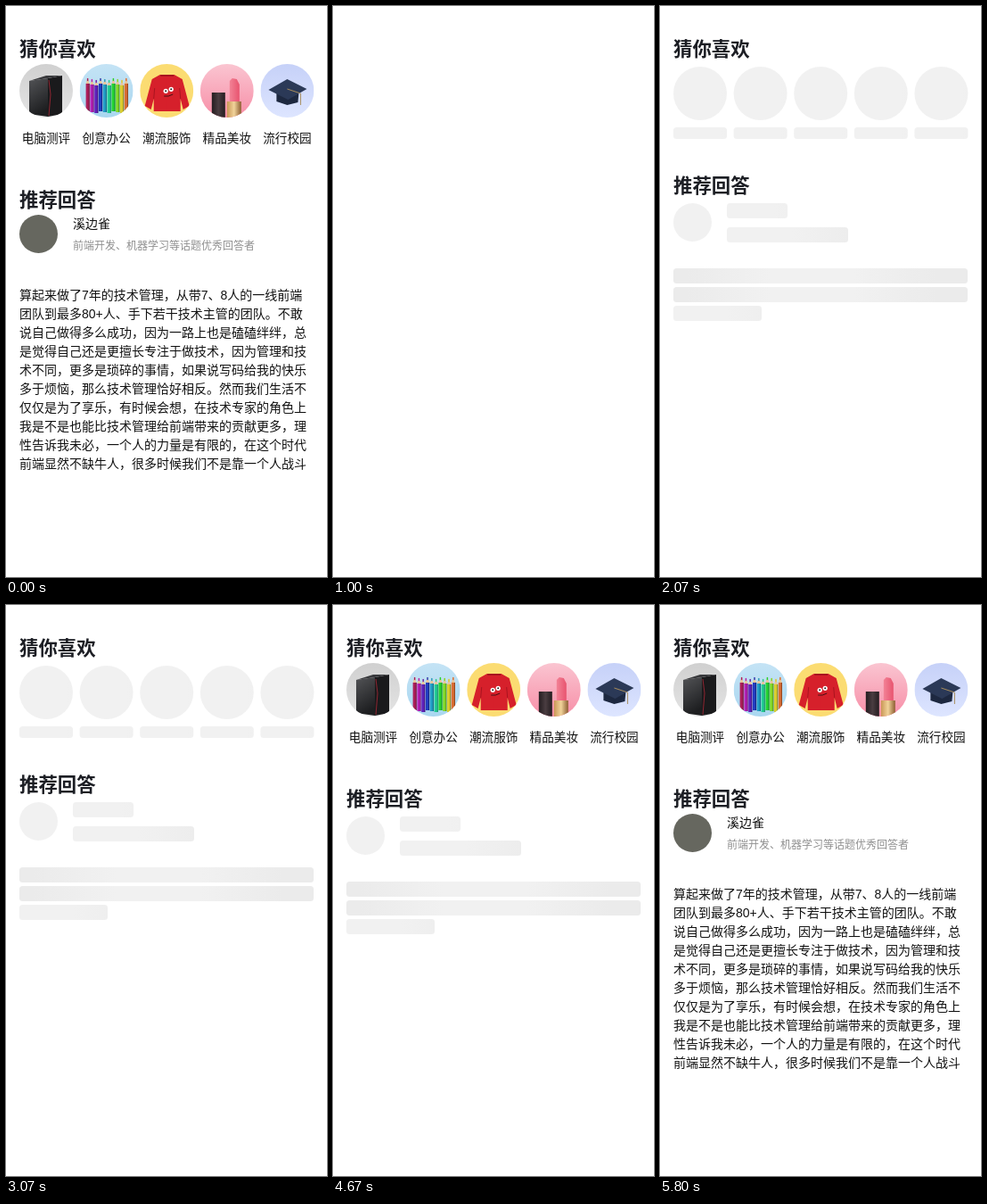
An HTML page with a canvas for the animation above (5940 ms loop, 360 px wide and 640 px high).

```html
<!DOCTYPE html>
<html lang="zh-CN">
<head>
<meta charset="utf-8">
<title>推荐回答</title>
<style>
html, body { margin: 0; width: 100%; height: 100%; overflow: hidden; background: #fff; }
canvas { display: block; width: 360px; height: 640px; }
</style>
</head>
<body>
<canvas id="stage"></canvas>
<script>
const W = 360, H = 640, LEFT = 15, LOOP = 5940;
const RELOAD = 1000, SKELETON = 1330, TOPICS = 3870, ANSWER = 4870;
const SWEEP = 270, STEP = 66.7, REACH = 140;
const FONT = '"Liberation Sans", "Noto Sans CJK SC", "Noto Sans CJK", sans-serif';
const INK = '#121212', GREY = '#ebebeb', LIGHT = '#f1f1f1';

const canvas = document.getElementById('stage');
const dpr = window.devicePixelRatio || 1;
canvas.width = W * dpr;
canvas.height = H * dpr;
const ctx = canvas.getContext('2d');

const topics = [
  ['电脑测评', drawComputer],
  ['创意办公', drawPencils],
  ['潮流服饰', drawSweater],
  ['精品美妆', drawLipstick],
  ['流行校园', drawCap]
];
const answer = [
  '算起来做了7年的技术管理，从带7、8人的一线前端',
  '团队到最多80+人、手下若干技术主管的团队。不敢',
  '说自己做得多么成功，因为一路上也是磕磕绊绊，总',
  '是觉得自己还是更擅长专注于做技术，因为管理和技',
  '术不同，更多是琐碎的事情，如果说写码给我的快乐',
  '多于烦恼，那么技术管理恰好相反。然而我们生活不',
  '仅仅是为了享乐，有时候会想，在技术专家的角色上',
  '我是不是也能比技术管理给前端带来的贡献更多，理',
  '性告诉我未必，一个人的力量是有限的，在这个时代',
  '前端显然不缺牛人，很多时候我们不是靠一个人战斗'
];

const columnX = i => 45 + i * 67.6;

function text(str, x, y, size, color = INK, weight = 400, align = 'left') {
  ctx.font = `${weight} ${size}px ${FONT}`;
  ctx.textAlign = align;
  ctx.fillStyle = color;
  ctx.fillText(str, x, y);
}

function title(str, y) {
  text(str, LEFT, y, 21.4, '#1c1e24', 700);
}

function rect(x, y, w, h, color) {
  ctx.fillStyle = color;
  ctx.fillRect(x, y, w, h);
}

function disc(x, y, r, color) {
  ctx.beginPath();
  ctx.arc(x, y, r, 0, Math.PI * 2);
  ctx.fillStyle = color;
  ctx.fill();
}

function path(points) {
  ctx.beginPath();
  for (const [x, y] of points) ctx.lineTo(x, y);
}

function poly(color, ...points) {
  path(points);
  ctx.fillStyle = color;
  ctx.fill();
}

function line(color, width, ...points) {
  path(points);
  ctx.strokeStyle = color;
  ctx.lineWidth = width;
  ctx.stroke();
}

function gradient(x0, y0, x1, y1, ...colors) {
  const g = ctx.createLinearGradient(x0, y0, x1, y1);
  colors.forEach((color, i) => g.addColorStop(i / (colors.length - 1), color));
  return g;
}

function backdrop(top, bottom) {
  rect(-30, -30, 60, 60, gradient(0, -30, 0, 30, top, bottom));
}

// Each picture is drawn around its own centre and clipped to a disc.
function badge(x, y, draw) {
  ctx.save();
  ctx.translate(x, y);
  ctx.beginPath();
  ctx.arc(0, 0, 30, 0, Math.PI * 2);
  ctx.clip();
  draw();
  ctx.restore();
}

function drawComputer() {
  backdrop('#d0d0d0', '#e4e4e4');
  poly(gradient(-19, -12, 2, 20, '#505154', '#1d1e20'), [-19, -11], [2, -14], [2, 29], [-19, 26]);
  poly('#1a1a1c', [2, -14], [18, -17], [18, 26], [2, 29]);
  poly('#38393c', [-19, -11], [0, -17], [18, -17], [2, -14]);
  line('#8f2531', 1, [3, -12], [5, 4], [3, 28]);
}

function drawPencils() {
  backdrop('#c4e3f5', '#a9d7f0');
  for (let i = 0; i < 10; i++) {
    const x = -23 + i * 4.8, top = -8 + i % 3, color = `hsl(${335 - i * 35} 70% ${40 + i * 1.5}%)`;
    poly('#e6c39a', [x, top], [x + 2, top - 7], [x + 4, top]);
    rect(x + 1.3, top - 6, 1.4, 3, color);
    rect(x, top, 4.2, 31, color);
    rect(x + 3, top, 1.2, 31, 'rgba(0,0,0,.3)');
  }
}

function drawSweater() {
  backdrop('#fbdc72', '#fbdc72');
  for (const side of [-1, 1]) {
    ctx.save();
    ctx.translate(0.5, 0);
    ctx.scale(side, 1);
    poly('#d6202b', [-0.5, -17], [8, -18], [17, -13], [25, 17], [18, 21], [15, 9], [15, 23], [-0.5, 23]);
    line('#a9141f', 1, [15, 9], [14, -3]);
    ctx.restore();
  }
  line('#a9141f', 2, [-7, -17], [8, -17]);
  for (const x of [-1, 5]) {
    disc(x, x / -3, 2.6, '#fff');
    disc(x, x / -3, 1, '#222');
  }
  line('#451015', 1, [-3, 6], [2, 6], [7, 4]);
}

function drawLipstick() {
  backdrop('#fac5d1', '#f78ea7');
  rect(-17, 2, 15, 30, gradient(-17, 0, -2, 0, '#241d20', '#4a3d41', '#241d20'));
  poly(gradient(3, 0, 14, 0, '#f28296', '#e8546f'), [3, 12], [3, -11], [6, -14], [11, -13], [14, -7], [14, 12]);
  rect(0, 12, 16, 20, gradient(0, 0, 16, 0, '#c99755', '#f1d39a', '#8c5d31'));
}

function drawCap() {
  backdrop('#c6d1f8', '#dde5ff');
  poly('#1d2840', [-12, 2], [13, 2], [12, 13], [0, 16], [-12, 12]);
  poly('#2b3957', [-21, -1], [0, -13], [22, -2], [1, 10]);
  line('#a88d5c', 1, [0, -2], [15, 3], [15, 16]);
}

// The highlight rests at a point that moves right as blocks get wider.
function block(x, y, w, h, p, radius = 3.5) {
  const c = x - REACH + (w * w / 700 + REACH) * p;
  ctx.fillStyle = p ? gradient(c - REACH, 0, c + REACH, 0, GREY, LIGHT, LIGHT, GREY) : GREY;
  ctx.beginPath();
  ctx.roundRect(x, y, w, h, radius);
  ctx.fill();
}

function topicBlocks(p) {
  topics.forEach((_, i) => {
    const x = columnX(i) - 30;
    block(x, 68, 60, 60, p, 30);
    block(x, 136, 60, 13, p);
  });
}

function answerBlocks(y, p) {
  block(LEFT, y, 43, 43, p, 21.5);
  block(75, y, 68, 17, p);
  block(75, y + 27, 136, 17, p);
  [330, 330, 99].forEach((w, i) => block(LEFT, y + 73 + i * 21, w, 17, p));
}

function topicRow() {
  topics.forEach(([label, draw], i) => {
    badge(columnX(i), 95, draw);
    text(label, columnX(i), 153, 13.6, INK, 400, 'center');
  });
}

function answerCard() {
  disc(36.5, 255.5, 21.5, '#66675f');
  text('溪边雀', 75, 249, 14);
  text('前端开发、机器学习等话题优秀回答者', 75, 273, 12, '#8f8f8f');
  answer.forEach((str, i) => text(str, LEFT, 329 + i * 21, 14));
}

// The highlight moves in coarse steps, then rests.
function sweep(elapsed) {
  return Math.min(1, Math.round(elapsed / STEP) * STEP / SWEEP);
}

function render(t) {
  ctx.setTransform(dpr, 0, 0, dpr, 0, 0);
  rect(0, 0, W, H, '#fff');
  if (t >= RELOAD && t < SKELETON) return;

  const topicsLoading = t >= SKELETON && t < TOPICS;
  const answerLoading = t >= SKELETON && t < ANSWER;
  const shift = topicsLoading ? 0 : 16;
  const p = sweep(t - (topicsLoading ? SKELETON : TOPICS));

  title('猜你喜欢', 56);
  title('推荐回答', 209 + shift);
  if (topicsLoading) topicBlocks(p);
  else topicRow();
  if (answerLoading) answerBlocks(221 + shift, p);
  else answerCard();
}

const start = performance.now();
function tick() {
  render((performance.now() - start) % LOOP);
  requestAnimationFrame(tick);
}
tick();
</script>
</body>
</html>
```
